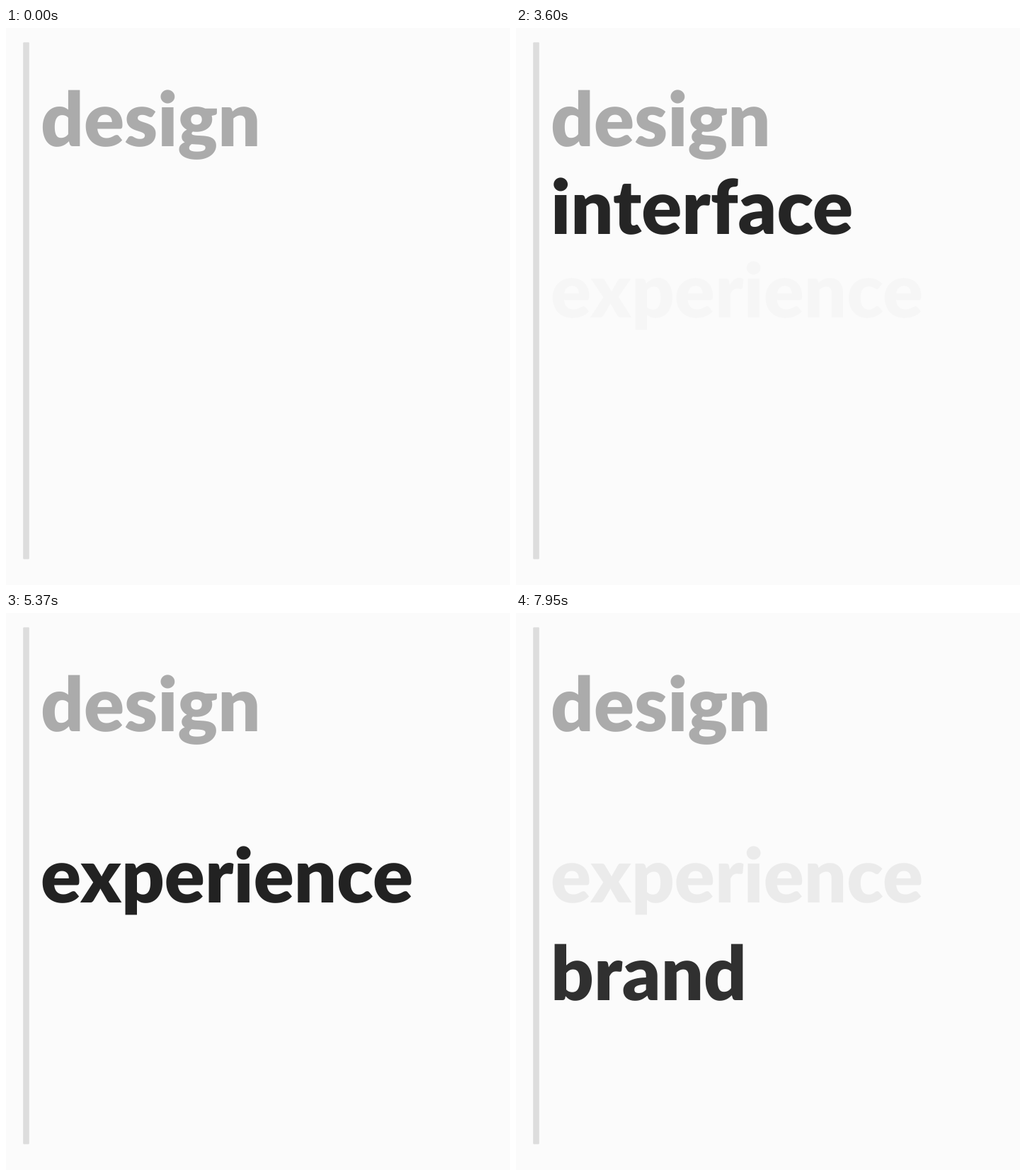
An HTML page for the animation above (8000 ms loop, 712 by 787 pixels).

```html
<!DOCTYPE html>
<html lang="en">
<meta charset="utf-8">
<title>design</title>
<style>
  html, body { margin: 0; height: 100%; overflow: hidden; background: #fbfbfb; }
  svg { display: block; width: 712px; height: 787px; }
  text { font: 900 106px Lato, sans-serif; fill: #222; text-rendering: geometricPrecision; }
</style>
<svg viewBox="0 0 712 787">
  <rect x="24.2" y="20.2" width="8.6" height="730.3" rx="1" fill="#ddd"/>
  <text x="49" y="166.8" style="fill:#ababab">design</text>
  <text class="word" x="49" y="291">interface</text>
  <text class="word" x="49" y="409">experience</text>
  <text class="word" x="49" y="547">brand</text>
</svg>
<script>
  const LOOP = 8000, FIRST = 870, PERIOD = 2700, FADE = 1800, REVEAL = 1050;
  const words = [...document.querySelectorAll('.word')];
  const start = performance.now();

  // Progress of the cross-fade that brings in word i
  const fade = (t, i) =>
    t < REVEAL ? 0 : Math.min(1, Math.max(0, (t - FIRST - i * PERIOD) / FADE));

  function draw(now) {
    const t = Math.max(0, now - start) % LOOP;
    words.forEach((word, i) => {
      word.style.opacity = fade(t, i) - fade(t, i + 1);
    });
    requestAnimationFrame(draw);
  }
  draw(start);
</script>
</html>
```
